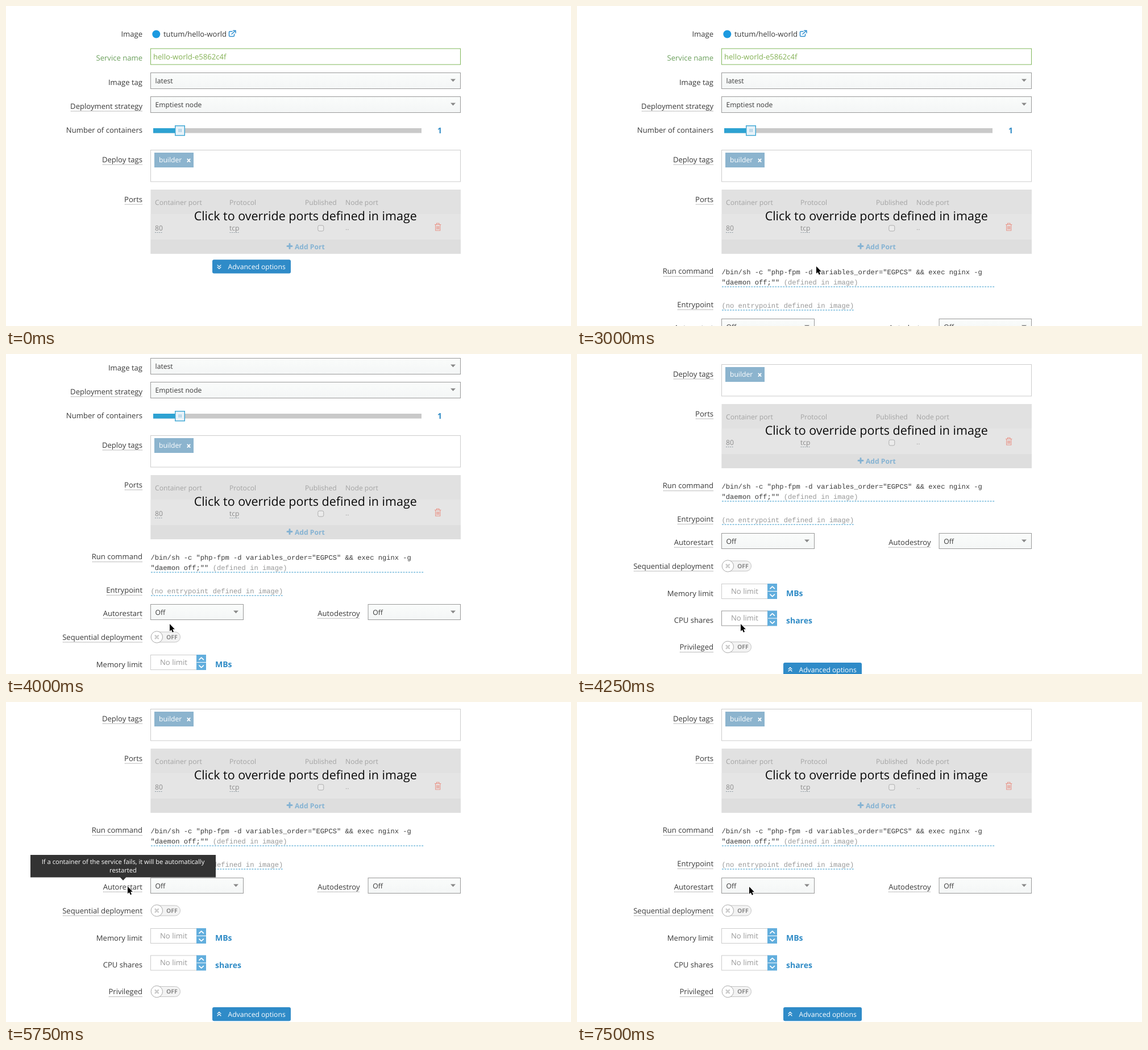
Animation of 994x563 px, one loop 8000 ms. Source, as an HTML page:

```html
<!DOCTYPE html>
<html lang="en">
<head>
<meta charset="utf-8">
<title>Service settings</title>
<style>
html, body { margin: 0; width: 100%; height: 100%; overflow: hidden; background: #fff; }
svg { display: block; width: 994px; height: 563px; }
text { font: 13.08px "Open Sans", sans-serif; fill: #3a3a3a; white-space: pre; text-rendering: geometricPrecision; }
.s { font-size: 12.14px; }
.b { font-weight: 700; }
.mono { font: 12.14px "Liberation Mono", monospace; }
.blue { fill: #2f8bc6; font-size: 14px; }
.mute { fill: #a3a3a3; }
.white { fill: #fff; }
.end { text-anchor: end; }
.mid { text-anchor: middle; }
.line { fill: none; stroke-linecap: round; stroke-linejoin: round; }
</style>
</head>
<body>
<svg viewBox="0 0 994 563">
  <defs>
    <linearGradient id="sel" x2="0" y2="1">
      <stop stop-color="#fafcfb"/><stop offset="1" stop-color="#f4f6f6"/>
    </linearGradient>
  </defs>
  <g id="page"></g>
  <g id="tip"></g>
  <path id="cursor" d="M0 0V12.8L2.8 10.2L4.9 14.7L7 13.8L5 9.3H8.9Z" stroke="#fff" stroke-width="1.5" paint-order="stroke"/>
</svg>
<script>
const $ = id => document.getElementById(id);

const text = (x, y, str, cls = '', attrs = '') =>
  `<text x="${x}" y="${y}" class="${cls}" ${attrs}>${str}</text>`;
const box = (x, y, w, h, fill, attrs = '') =>
  `<rect x="${x}" y="${y}" width="${w}" height="${h}" fill="${fill}" ${attrs}/>`;
const line = (d, color, width = 1, attrs = '') =>
  `<path d="${d}" class="line" stroke="${color}" stroke-width="${width}" ${attrs}/>`;
const dashed = (x1, x2, y, color, dash) =>
  line(`M${x1} ${y}H${x2}`, color, 1, `stroke-dasharray="${dash}" style="stroke-linecap:butt"`);

// Right-aligned label; a left edge adds the dotted help underline.
const label = (y, str, left, right = 240) =>
  text(right, y, str, 'end') + (left ? dashed(left, right, y + 4.3, '#777', '.93 .93') : '');

const select = (x, y, w, h, value) =>
  box(x + .5, y + .5, w - 1, h - 1, 'url(#sel)', 'stroke="#999"') +
  text(x + 8.6, y + 18.7, value, 's') +
  `<path d="M${x + w - 18} ${y + 11.5}h9l-4.5 4.7z" fill="#888"/>`;

const toggle = y =>
  box(255.5, y - 9, 51, 18, '#f3f3f3', 'rx="9" stroke="#c4c4c4"') +
  `<circle cx="265.3" cy="${y}" r="10.2" fill="#fff" stroke="#aaa"/>` +
  line(`M262.7 ${y - 2.6}l5.2 5.2m0 -5.2l-5.2 5.2`, '#ccc', 2.6) +
  text(282, y + 3.8, 'OFF', 'b', 'style="font-size:10.5px;fill:#8a8a8a"');

const spinner = (y, unit, id) =>
  box(254.5, y + .5, 81, 26, '#fff', `id="${id}" stroke="#ccc"`) +
  text(271, y + 17.5, 'No limit', '', 'style="fill:#999"') +
  box(335, y, 17, 13, '#62aedd') + box(335, y + 14, 17, 13, '#62aedd') +
  line(`M340 ${y + 8.6}l3.7 -3.4l3.7 3.4M340 ${y + 19.2}l3.7 3.4l3.7 -3.4`, '#fff', 1.8) +
  text(368, y + 22, unit, 'b blue');

const button = (y, dir, id) => {
  const c = dir > 0 ? y + 9.5 : y + 15;
  return box(363, y, 138, 24.3, '#2f8bc8', `rx="3" id="${id}"`) +
    line(`M372 ${c}l3 ${3 * dir}l3 ${-3 * dir}m-6 ${3.6 * dir}l3 ${3 * dir}l3 ${-3 * dir}`, '#fff', 1.2) +
    text(390.5, y + 16.8, 'Advanced options', 's white');
};

const basics = [
  label(53.7, 'Image'),
  '<circle cx="264.3" cy="49.5" r="7" fill="#1c9ae0"/>',
  text(277, 53.7, 'tutum/hello-world'),
  line('M398 44.8H394a1.5 1.5 0 0 0 -1.5 1.5V52a1.5 1.5 0 0 0 1.5 1.5h6a1.5 1.5 0 0 0 1.5 -1.5V49.5M397 49.5L403.5 43.5M399.7 43.2H404V47.5', '#2f8fd0', 1.5),
  text(240, 95.8, 'Service name', 'end', 'style="fill:#6a9f5b"'),
  box(254.5, 75, 545, 28, '#fff', 'stroke="#80b75a"'),
  text(259, 94, 'hello-world-e5862c4f', '', 'style="fill:#82b052"'),
  label(138.7, 'Image tag'),
  select(254, 117, 546, 29, 'latest'),
  label(180.7, 'Deployment strategy', 114),
  select(254, 159, 546, 29, 'Emptiest node'),
  label(222.7, 'Number of containers'),
  box(259, 215, 472, 8.5, '#c9c9c9'),
  box(259, 215, 40, 8.5, '#2da2d2'),
  box(297.7, 210.7, 16.6, 17, '#e9f3f9', 'stroke="#3aa5d3" stroke-width="1.4"'),
  line('M304 216.5v5M306.2 216.5v5M308.4 216.5v5', '#8dbfdc', 1),
  text(759, 223.7, '1', 'b blue'),
  label(274.7, 'Deploy tags', 170),
  box(254.5, 253.5, 545, 55.5, '#fff', 'stroke="#ccc"'),
  box(261, 258, 69, 26, '#8cb4ce'),
  text(269, 275, 'builder', 's white'),
  line('M319.3 269.3l4.4 4.8m0 -4.8l-4.4 4.8', '#fff', 1.8),
  label(344.7, 'Ports', 209),
  box(254.5, 323, 545.5, 113, '#e1e1e1'),
  box(254.5, 366, 545.5, 45, '#e5e5e5'),
  box(254.5, 411, 545.5, 25, '#dedede'),
  text(262, 349.7, 'Container port', 's mute'),
  text(393, 349.7, 'Protocol', 's mute'),
  text(526, 349.7, 'Published', 's mute'),
  text(597, 349.7, 'Node port', 's mute'),
  text(262, 395.3, '80', 's', 'style="fill:#8c8c8c"'),
  text(393, 395.3, 'tcp', 's', 'style="fill:#8c8c8c"'),
  dashed(262, 276, 398.5, '#8e9ba3', '2 1.5'),
  dashed(393.5, 411, 398.5, '#8e9ba3', '2 1.5'),
  box(548.8, 386, 10, 10, '#ebebeb', 'rx="2.5" stroke="#adadad"'),
  text(597, 394, '..', 's mute'),
  line('M754.5 384.5H765M757.5 384V382.3H762V384M755.7 385V395H763.8V385M758 387.5V392.5M759.8 387.5V392.5M761.6 387.5V392.5', '#e9968a', 1.1),
  line('M499 418.5v8M495 422.5h8', '#85b3d3', 3),
  text(508, 427.7, 'Add Port', 's b', 'style="fill:#85b3d3"'),
  text(526.7, 377.2, 'Click to override ports defined in image', 'mid', 'style="font-size:21.48px;fill:#0a0a0a"')
];

const advanced = [
  label(471.4, 'Run command', 152),
  text(254.5, 472, '/bin/sh -c "php-fpm -d variables_order="EGPCS" &amp;&amp; exec nginx -g', 'mono'),
  text(254.5, 490, '"daemon off;"" <tspan fill="#999">(defined in image)</tspan>', 'mono'),
  dashed(255, 736, 494, '#2a94c8', '2.8 1.87'),
  label(530, 'Entrypoint', 177),
  text(254.5, 531, '(no entrypoint defined in image)', 'mono', 'style="fill:#999"'),
  dashed(255, 488, 535, '#2a94c8', '2.8 1.87'),
  label(570.8, 'Autorestart', 171),
  select(254, 550, 164, 28, 'Off'),
  label(570.8, 'Autodestroy', 548, 622.5),
  select(636.6, 550, 163.4, 28, 'Off'),
  label(612.7, 'Sequential deployment', 100),
  toggle(608),
  label(660.5, 'Memory limit'),
  spinner(639, 'MBs', 'memory'),
  label(708, 'CPU shares'),
  spinner(686.5, 'shares', 'cpu'),
  label(755.2, 'Privileged', 181),
  toggle(750.5),
  button(778, -1, 'less')
];

$('page').innerHTML = basics.join('') +
  `<g id="closed">${button(446.3, 1, 'more')}</g><g id="open">${advanced.join('')}</g>`;

$('tip').innerHTML =
  '<path d="M43 269H369V308.5H211.2L206 314L200.8 308.5H43Z" fill="#333"/>' +
  ['If a container of the service fails, it will be automatically', 'restarted']
    .map((s, i) => text(206, 285 + 15 * i, s, 'mid white', 'style="font-size:11.2px"')).join('');

const LOOP = 8000;
// [time, x, y] of the pointer
const pointer = [
  [0, -50, -50], [500, 625, 220], [750, 500, 372], [1000, 463, 426], [1250, 456, 440],
  [1500, 448, 456], [1750, 448, 458], [2500, 439, 458], [2750, 421, 458],
  [3500, 297, 475], [3750, 288, 475], [5000, 246, 354], [5250, 216, 303],
  [5500, 214, 318], [5750, 214, 324.5], [7250, 250, 324.5], [7500, 303, 325]
];
const scroll = [[0, 0], [4000, 110], [4250, 235], [4500, 241]];
const tipAlpha = [[0, 0], [5750, 1], [7250, .4], [7500, 0]];

const at = (steps, t) => steps.findLast(s => s[0] <= t);
const within = (t, a, b) => t >= a && t < b;
const show = (id, on) => $(id).setAttribute('display', on ? 'inline' : 'none');

function draw(t) {
  const [, x, y] = at(pointer, t);
  $('cursor').setAttribute('transform', `translate(${x} ${y})`);
  $('page').setAttribute('transform', `translate(0 ${-at(scroll, t)[1]})`);
  $('tip').setAttribute('opacity', at(tipAlpha, t)[1]);
  show('closed', t < 3000);
  show('open', t >= 3000);
  $('more').setAttribute('fill', t >= 2250 ? '#2776ab' : '#2f8bc8');
  $('cpu').setAttribute('stroke', within(t, 4250, 5000) ? '#999' : '#ccc');
}

const start = performance.now();
function tick() {
  draw((performance.now() - start) % LOOP);
  requestAnimationFrame(tick);
}
tick();
</script>
</body>
</html>
```
